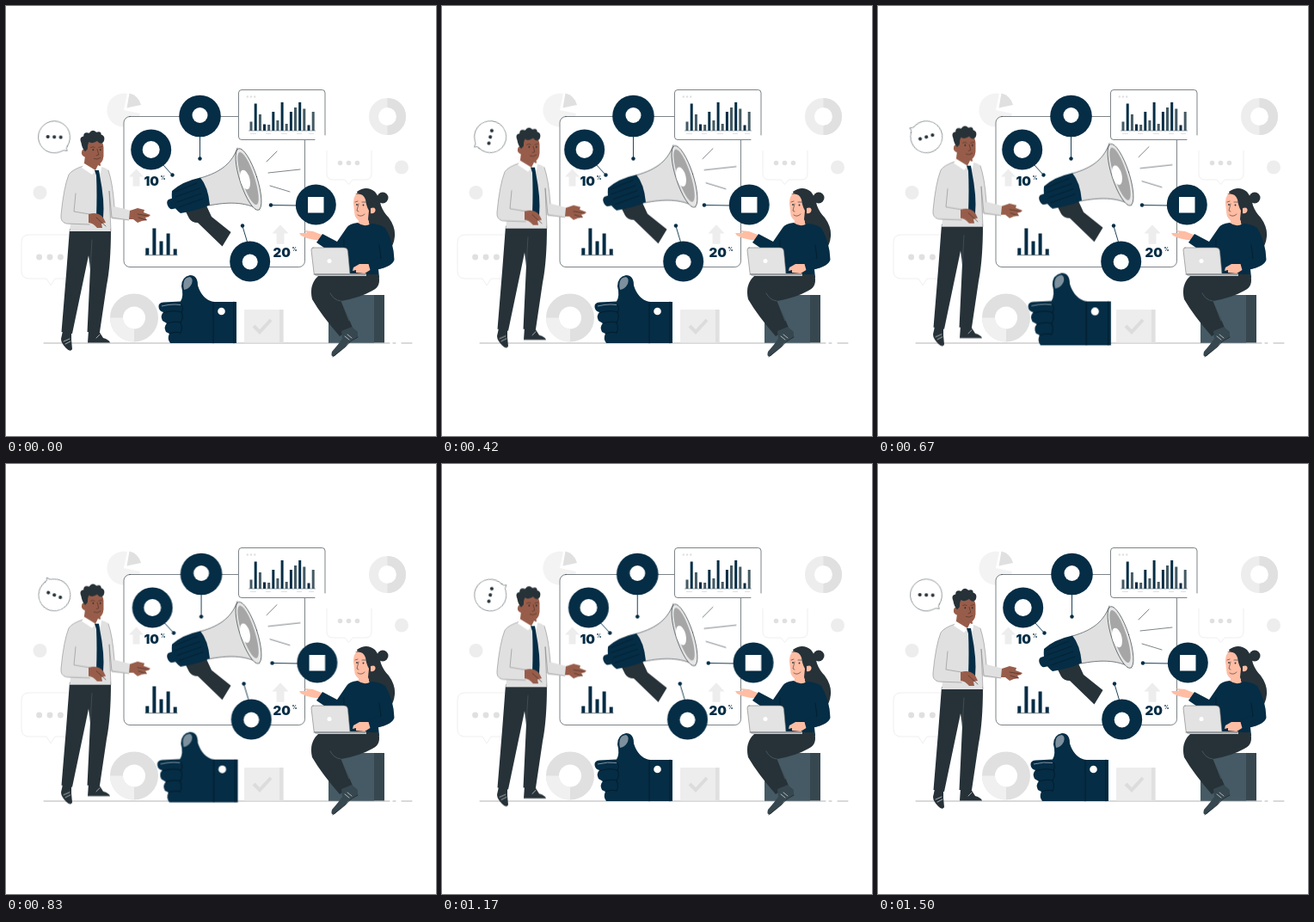
An HTML page without scripts for the animation above (1.54 s loop, 500 by 500 pixels).

```html
<!DOCTYPE html>
<html lang="en">
<head>
<meta charset="utf-8">
<title>Social media marketing</title>
<style>
  :root { --navy: #052d45; --dark: #263238; --grey: #e0e0e0; --pale: #ededed; }
  html, body { margin: 0; width: 100%; height: 100%; overflow: hidden; background: #fff; }
  svg { display: block; width: 100vw; height: 100vh; }
  .navy { fill: var(--navy); }
  .dark { fill: var(--dark); }
  .grey { fill: var(--grey); }
  .pale { fill: var(--pale); }
  .white { fill: #fff; }
  .line { fill: none; stroke: var(--dark); stroke-width: .6; stroke-linecap: round; stroke-linejoin: round; }
  .ghost { fill: #fff; stroke: #efefef; }
  .him { fill: #985d4a; }
  .her { fill: #ffbda4; }
  .pin line { stroke: var(--navy); stroke-width: .9; }
  text { font: 900 15px Inter, "Noto Sans", sans-serif; fill: var(--navy); }
  .pct { font-size: 6px; font-weight: 700; }

  /* Each cycle rests for the last 40 ms of the loop. */
  .float, .spin, .beat, .shake { animation: 1540ms linear infinite; }
  .float { animation-name: float; }
  .spin { animation-name: spin; }
  .beat { animation-name: beat; animation-timing-function: ease-in-out; transform-origin: 223px 353px; }
  .shake { animation-name: shake; animation-timing-function: ease-out; }
  @keyframes float {
    0%, 97.4%, 100% { transform: translateY(0); }
    48.7% { transform: translateY(-6px); }
  }
  @keyframes spin {
    0% { transform: rotate(2deg); }
    97.4%, 100% { transform: rotate(362deg); }
  }
  @keyframes beat {
    0%, 27.3%, 68.2%, 100% { transform: scale(1); }
    13.6%, 40.9% { transform: scale(1.065); }
  }
  @keyframes shake {
    0%, 97.4%, 100% { transform: translateX(0); }
    9.7%, 87.7% { transform: translateX(-1px); }
    19.5%, 77.9% { transform: translateX(2px); }
    29.2%, 48.7%, 68.2% { transform: translateX(-3.4px); }
    39%, 58.4% { transform: translateX(3.4px); }
  }
</style>
</head>
<body>
<svg viewBox="0 0 500 500">
  <defs>
    <path id="arrow" d="M0-10L8.5-1H4V10H-4V-1H-8.5Z"/>
    <g id="dots"><circle cx="-7.5" r="2.1"/><circle r="2.1"/><circle cx="7.5" r="2.1"/></g>
  </defs>

  <!-- Backdrop -->
  <path d="M137 121L141 102A19.5 19.5 0 1 0 156 125Z" fill="#f3f3f3"/>
  <path class="grey" d="M140.500 118.500L143.500 101.500Q154 104 157 115Z"/>
  <g fill="none" stroke-width="11">
    <circle cx="443.500" cy="128.500" r="16" stroke="#ededed"/>
    <path d="M443.500 112.500a16 16 0 1 1 0 32" stroke="#e0e0e0"/>
    <circle cx="149" cy="362.500" r="20.500" stroke="#e0e0e0" stroke-width="15"/>
    <path d="M149 383a20.500 20.500 0 0 1-20.500-20.500" stroke="#f0f0f0" stroke-width="15"/>
  </g>
  <circle class="pale" cx="39.500" cy="217" r="8"/>
  <circle class="pale" cx="460" cy="187.500" r="8"/>
  <path class="ghost" d="M27 266H76Q84 266 84 274V309Q84 317 76 317H57L52 325L47 317H27Q18 317 18 308V275Q18 266 27 266Z"/>
  <use href="#dots" class="grey" transform="translate(51 292) scale(1.65)"/>
  <path class="ghost" d="M373 168V195Q373 202 380 202H394L398.500 207.500L403 202H418Q425 202 425 195V168"/>
  <use href="#dots" class="grey" transform="translate(398.500 182.500) scale(1.33)"/>
  <path class="line" d="M44 392H446M450 392H453M460 392H472" style="stroke:#666;stroke-width:.5"/>
  <rect class="pale" x="277" y="353" width="45.500" height="38.500" rx="1"/>
  <path class="grey" d="M318 353H322.500V391.500H318Z"/>
  <path d="M288 372L295 379L308 365" fill="none" stroke="#dcdcdc" stroke-width="4"/>

  <!-- Screen and chart card -->
  <rect class="line" x="137" y="128.500" width="210.500" height="175" rx="7" style="fill:#fff"/>
  <rect class="white" x="270" y="97" width="102" height="59" rx="4"/>
  <path class="line" d="M359 155.500H274Q270.500 155.500 270.500 152V101Q270.500 97.500 274 97.500H367.500Q371 97.500 371 101V150"/>
  <use href="#dots" class="grey" transform="translate(285 105.500) scale(.56)"/>
  <g fill="none" stroke-width="3">
    <path stroke="#052d45" d="M290.200 145v-31.500M300.500 145v-7.500M310.800 145v-22M321.100 145v-33M331.400 145v-22M341.700 145v-33M352 145v-6.500"/>
    <path stroke="#455a64" d="M285 145v-10.500M295.400 145v-19M305.700 145v-7M315.900 145v-12M326.200 145v-8M336.500 145v-27M346.800 145v-25.500M357.200 145v-22"/>
    <path stroke="#455a64" stroke-width=".5" d="M282 145H360"/>
    <path stroke="#ccc" stroke-width=".6" d="M284 148.500h7m11 0h6m12 0h7m11 0h6m8 0h6"/>
    <path stroke="#052d45" stroke-width="4" d="M164.300 289.500v-8M172.400 289.500v-31M180.500 289.500v-16M188.600 289.500v-25M196.700 289.500v-7"/>
  </g>
  <path class="line" d="M162 289.700H199"/>
  <use href="#arrow" class="pale" x="151.500" y="199.500"/>
  <use href="#arrow" class="pale" transform="translate(319 265.500) scale(1.12)"/>
  <text x="160.500" y="209">10</text><text class="pct" x="179.500" y="202">%</text>
  <text x="310.500" y="292">20</text><text class="pct" x="332.500" y="285">%</text>

  <!-- Megaphone -->
  <g class="float">
    <path class="dark" d="M208 237L213 247Q216 252 223 252L251.500 279.500L261.500 263L239 245L233 232Z"/>
    <path class="grey" d="M226 200C251 193 263 182 269 165L295 237C277 227 257 228 236 232Z"/>
    <path class="line" d="M226 200C251 193 263 182 269 165M295 237C277 227 257 228 236 232"/>
    <ellipse class="line" cx="282" cy="201.500" rx="10" ry="37.500" transform="rotate(-18 282 201.500)" style="fill:#e6e6e6"/>
    <ellipse cx="281.500" cy="200.500" rx="7.500" ry="32" transform="rotate(-18 281.500 200.500)" fill="#a6a6a6"/>
    <ellipse class="white" cx="278" cy="202" rx="5.500" ry="11.500" transform="rotate(-14 278 202)"/>
    <path class="navy" d="M193 215Q205 204 226 199.500Q235 210 237 231.500Q222 238 203 241Q191 233 193 215Z"/>
    <path class="navy" d="M195 223L189 225Q186 227 188 232Q190 237 194 236L199 235Z"/>
    <path class="line" d="M197 216L222 206M197 222L225 212M199 228L227 218M201 234L229 224" style="stroke:#021b2b"/>
    <path class="line" d="M303 181L315 169M305 194L342 190M307 209L330 216"/>
  </g>

  <!-- Network pins -->
  <g class="shake pin navy">
    <line x1="225.500" y1="150" x2="225.500" y2="177"/><circle cx="225.500" cy="177.500" r="2.200"/>
    <line x1="181" y1="183" x2="193" y2="196"/><circle cx="193.500" cy="196.500" r="2.200"/>
    <line x1="340" y1="232" x2="308" y2="231.500"/><circle cx="308" cy="231.500" r="2.200"/>
    <line x1="281" y1="276" x2="275" y2="256"/><circle cx="275" cy="255.500" r="2.200"/>
    <circle cx="225.500" cy="128" r="24.300"/><circle cx="168.700" cy="167" r="23.500"/>
    <circle cx="360.300" cy="231" r="23.500"/><circle cx="283.700" cy="297" r="23.500"/>
    <g class="white">
      <circle cx="225.500" cy="127" r="9"/><circle cx="168.700" cy="167" r="10"/>
      <rect x="351" y="222" width="18.500" height="18.500"/><circle cx="283.700" cy="297.500" r="9"/>
    </g>
  </g>

  <!-- Thumb -->
  <g class="beat">
    <path class="navy" d="M268 344H241Q228 341 223 325Q223 313 214 313Q204 315 204 326Q207 337 203 343.500L183 344.500Q177 345 177.500 350Q178 355 183 356Q179 360 182 366L187 369Q183 373 186 379L190 381Q187 387 191 392H268Z"/>
    <path d="M207 330Q204 316 214 315Q218 317 216 323Q213 329 207 330Z" fill="#7d909d"/>
    <path class="line" d="M184 356.500Q196 353 204 356M187 369Q197 366 203 368M190 381Q198 378 203 380M204 347Q207 352 204 356Q207 362 203 368Q206 375 203 380M241 344V392M265 344V392" style="stroke:#02131f"/>
    <path d="M181 349Q193 346 203 347.500" fill="none" stroke="#7d909d"/>
    <circle class="white" cx="250.500" cy="355" r="4.300"/>
  </g>

  <!-- Speech bubble -->
  <g transform="translate(56.200 152.300)">
    <g class="spin">
      <path class="line" d="M15.500 10A18.500 18.500 0 1 0 8 16.700Q11 14 15.500 15.500Q13.500 12.500 15.500 10Z" style="fill:#fff;stroke-width:.5"/>
      <use href="#dots" class="dark"/>
    </g>
  </g>

  <!-- Man -->
  <g class="float">
    <path class="dark" d="M66 378L64 387Q64 392 70 398Q75 403 77 399L76 388L76 379ZM96 377L95 391.500H121Q120 388 113 386L108 378Z"/>
    <path d="M67 390L74 387M69 393L75 390M105 386L109 382" class="line" style="stroke:#fff"/>
    <path class="dark" d="M74 259H122Q122 300 117 325L109 379H94.500L98 305L96 290L77 381L64.500 379L70 312Z"/>
    <path class="line" d="M98 305L100 272" style="stroke:#52616a"/>
    <path class="him" d="M92 174L90 190L104 196L110 185L108 176Z"/>
    <path class="grey" d="M90 186Q77 190 73 196Q67 211 64 243Q63 251 70 253L75 254L74 262H122L121 246L124 248L143 249L146 238L126 233Q124 205 119 191Q115 187 108 187L104 192Z"/>
    <path class="line" d="M90 186Q77 190 73 196Q67 211 64 243Q63 251 70 253L97 254M97 242L79 239L81 218M122 262L120 215L123 246L143 249M126 233Q124 205 119 191" style="stroke:#777;stroke-width:.5"/>
    <path class="white" d="M91 183L88 188L100 196L105 191L110 195L111 187L107 185L104 191Z"/>
    <path class="navy" d="M103 191H108L109 197Q115 227 113 247L110 252L105 246Q106 218 105 197Z"/>
    <path class="him" d="M96 242Q107 239 113 246L116 252L111 253L112 258L106 258Q101 252 96 252ZM144 238L153 235L161 237L160 240L168 243L166 245L162 246L164 249L158 250L153 252L148 248L143 248Z"/>
    <path class="line" d="M105 246L116 256M153 242L165 244M154 246L163 249" style="stroke:#3c2a25"/>
    <g transform="translate(6.500 12.900) scale(.93)">
      <path class="him" d="M91 157Q91 150 102 150Q114 150 115 163V174Q114 184 106 184Q95 183 92 175Q86 173 88 167Q90 164 92 167Z"/>
      <path class="dark" d="M92 168Q88 164 87 157Q84 150 90 149Q90 143 97 145Q101 139 106 144Q112 142 112 147Q118 149 115 156Q111 160 107 155Q101 159 97 156Q95 158 95 165Z"/>
      <path class="line" d="M99 163Q102 161 104 163M109 163L113 162M107 165L109 172L106 173M103 177Q107 179 111 176" style="stroke:#402a24"/>
      <circle class="dark" cx="102" cy="166" r="1"/><circle class="dark" cx="111" cy="166" r="1"/>
    </g>
  </g>

  <!-- Woman -->
  <path d="M375 336H440V391.500H375Z" fill="#37474f"/>
  <path d="M375 336H428V391.500H375Z" fill="#455a64"/>
  <circle class="dark" cx="438" cy="223" r="6.500"/>
  <path class="dark" d="M408 216Q419 208 429 216Q434 222 436 232Q439 240 445 246Q453 257 452 268Q451 278 446 283Q437 283 431 272L420 248Z"/>
  <path class="her" d="M411 244L409 255Q416 261 422 254L422 240Z"/>
  <path class="her" d="M408 218Q419 214 423 224V238Q421 250 412 250Q405 248 405 238L404 230Q404 221 408 218Z"/>
  <path class="dark" d="M406 219Q415 217 418 225Q419 233 422 238L421 248L425 258L434 250L429 222L418 213Z"/>
  <path class="her" d="M424 235Q430 233 429.500 238Q428 242 424 241Z"/>
  <path class="line" d="M406 228L409 227M414 228L418 228M410 230L408 238L410 239M409 243Q413 246 417 242"/>
  <circle class="dark" cx="408" cy="231" r=".9"/><circle class="dark" cx="415.500" cy="231.500" r=".9"/>
  <path class="her" d="M367 266L357 262L347 261L350 264L341 264L343 267L350 270L359 272L365 272Z"/>
  <path class="navy" d="M409 252Q399 253 396 258L385 274L368 265L361 275L386 292L390 290V316H434L433 306Q449 303 451.500 295Q451 275 441 258Q433 253 424 253Q417 258 409 252Z"/>
  <path class="line" d="M434 278L436 293L424 299M391 289Q394 280 393 272" style="stroke:#021824"/>
  <path class="dark" d="M386 312H433Q437 326 426 331Q412 339 390 343L403 374L388 384Q367 360 356 341Q352 324 363 314Z"/>
  <path class="line" d="M389 343Q381 342 377 334M390 343L399 366" style="stroke:#5b6a72"/>
  <path d="M390 378L402 373L409 379L409 385Q401 387 395 396L382 407Q377 409 379 402Q386 394 391 387Z" fill="#37474f"/>
  <path class="line" d="M380 408L394 397Q401 388 409 385" style="stroke:#111"/>
  <path class="line" d="M394 384L399 388M397 382L402 386" style="stroke:#fff"/>
  <path class="line" d="M357 281H393Q397 281 397.500 285L400 312H360Q358 312 358 310L355 284Q355 281 357 281Z" style="fill:#e3e3e3;stroke:#777"/>
  <path d="M358 311H419V314H360Z" fill="#c8c8c8"/>
  <path class="line" d="M358 312H419"/>
  <circle class="white" cx="376" cy="296.500" r="2.500"/>
  <path class="her" d="M423 300L411 300L404 304L403 308L407 307L407 310L417 311L425 306Z"/>
  <path class="navy" d="M421 298L434 292L440 304L424 309Z"/>
</svg>
</body>
</html>
```
